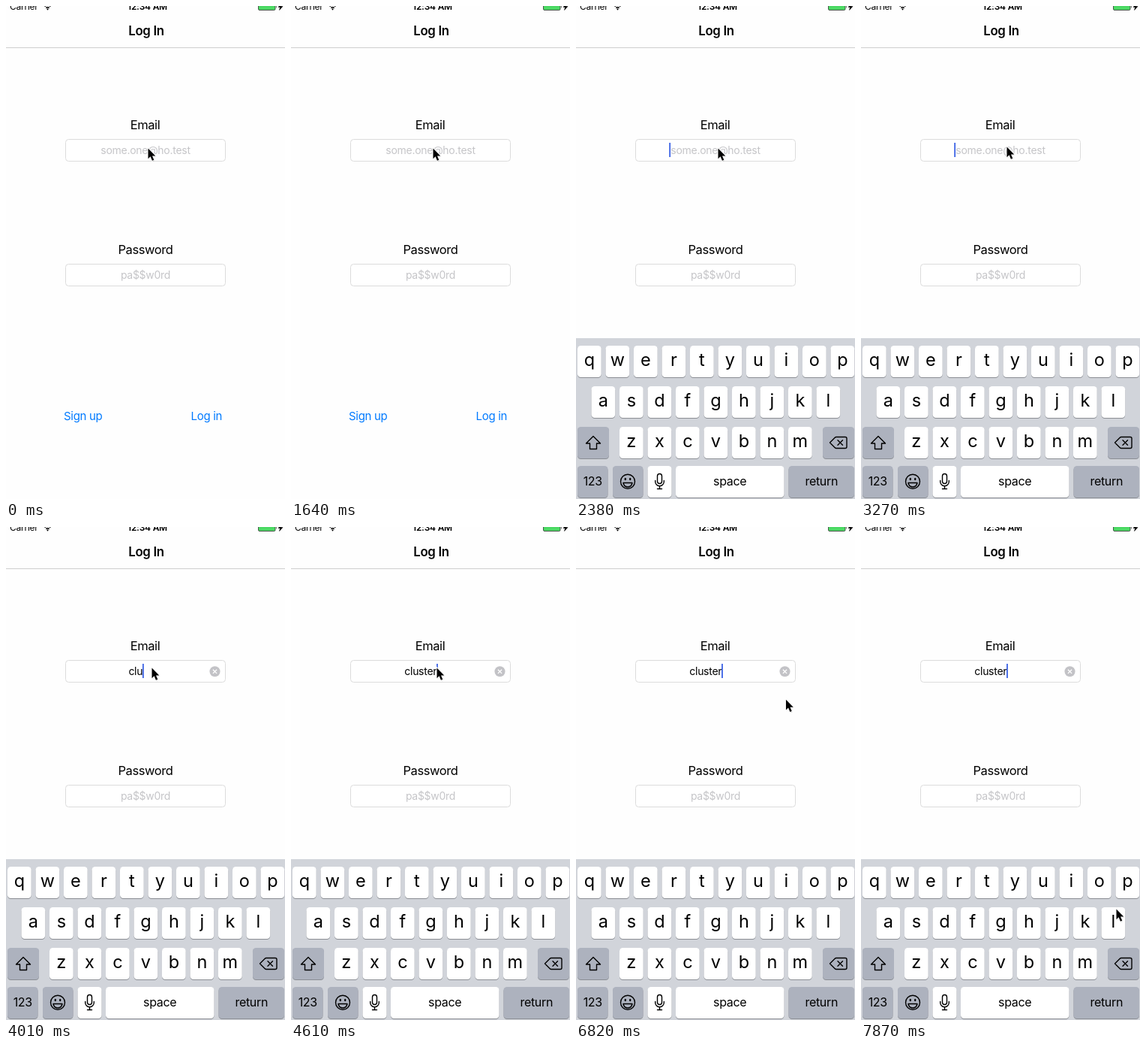
Recreate the animation shown at these times as an HTML page. Size 372 by 656 pixels, loop 8 s.

```html
<!DOCTYPE html>
<html lang="en">
<head>
<meta charset="utf-8">
<title>Log In</title>
<style>
  html, body { margin: 0; width: 100%; height: 100%; overflow: hidden; background: #fefefe; }
  svg { display: block; width: 372px; height: 656px; }
  text { font-family: Inter, Roboto, "Liberation Sans", sans-serif; letter-spacing: -.02em; }
  .mid { text-anchor: middle; }
  .label { font-size: 16.5px; letter-spacing: -.025em; }
  .input { font-size: 14px; }
  .hint { fill: #c5c5c8; }
  .link { font-size: 15px; fill: #007aff; }
  .letter { font-size: 23.5px; letter-spacing: 0; }
  .word { font-size: 16px; }
  .field { fill: #fff; stroke: #dcdcdc; }
  .line { fill: none; stroke: #000; stroke-width: 1.4; stroke-linejoin: round; stroke-linecap: round; }
</style>
</head>
<body>
<svg viewBox="0 0 372 656">
  <rect width="372" height="656" fill="#fefefe"/>

  <g id="status">
    <text x="5" y="5" font-size="12" letter-spacing="0">Carrier</text>
    <path d="M51.5 .5Q55.500-2.500 59.500 .5M53.300 2.700Q55.500 1 57.700 2.700" fill="none" stroke="#000" stroke-width="1.500"/>
    <circle cx="55.500" cy="4.300" r="1.100"/>
    <text class="mid" x="188.500" y="5" font-size="12" font-weight="600">12:34 AM</text>
    <rect x="336.500" y="-4" width="22.500" height="9.500" rx="1.500" fill="#4cd964" stroke="#333" stroke-width=".8"/>
    <path d="M360.500-1V2.500M367-3L363 1.500H365.500L364.500 5.500L369 .5H366.500L368-3Z" stroke="#000" stroke-width=".5"/>
  </g>
  <text class="mid" x="187" y="39" font-size="16.800" font-weight="600">Log In</text>
  <path d="M0 55.500H372" stroke="#cfcfcf"/>

  <text class="mid label" x="185.500" y="164">Email</text>
  <rect class="field" x="79.500" y="177.500" width="213" height="29" rx="4"/>
  <text class="mid input hint" id="hint" x="186" y="196.500">some.one@ho.test</text>
  <text class="mid input" id="typed" x="172.800" y="196.500"></text>
  <g id="clear">
    <circle cx="278.500" cy="192.300" r="7" fill="#c3c3c7"/>
    <path d="M275.900 189.700l5.200 5.200m0-5.200l-5.200 5.200" stroke="#fff" stroke-width="1.300"/>
  </g>
  <rect id="caret" y="182" width="1.900" height="19" fill="#4469e6"/>

  <text class="mid label" x="186" y="330">Password</text>
  <rect class="field" x="79.500" y="343.500" width="213" height="29" rx="4"/>
  <text class="mid input hint" x="186" y="362.500">pa$$w0rd</text>

  <text class="link" x="77" y="550.500">Sign up</text>
  <text class="link" x="246.500" y="550.500">Log in</text>

  <g id="keyboard">
    <rect y="442" width="372" height="220" fill="#d1d4da"/>
    <g id="keys"></g>
    <g class="line">
      <path d="M23 572.500L32.500 582H27.500V589.500H18.500V582H13.500Z"/>
      <path d="M338.500 581L345 574.500Q346 573.500 347 573.500H359Q361 573.500 361 575.500V586.500Q361 588.500 359 588.500H347Q346 588.500 345 587.500ZM349 577.700l6.500 6.600m0-6.600l-6.500 6.600"/>
      <circle cx="69" cy="632.700" r="9.500"/>
      <path d="M63 634.500H75Q74 640 69 640T63 634.500Z"/>
      <rect x="108.500" y="622.500" width="6" height="13" rx="3"/>
      <path d="M105.700 631.500V633a5.800 5.800 0 0 0 11.600 0V631.500M111.500 639V642.500M108.500 642.500H114.500"/>
    </g>
    <ellipse cx="65.800" cy="629.500" rx="1.200" ry="1.800"/>
    <ellipse cx="72.200" cy="629.500" rx="1.200" ry="1.800"/>
  </g>

  <circle id="touch" cx="191.500" cy="189.500" r="10" fill="#808080" fill-opacity=".4"/>
  <g id="mouse">
    <path d="M.5 1V15L3.800 12L6.200 17.500L8.800 16.400L6.400 11H11Z" fill="#000" fill-opacity=".15"/>
    <path d="M0 0V13.700L3.100 10.800L5.400 16.200L7.800 15.200L5.500 9.900H9.800Z" stroke="#fff" stroke-width="1.800" paint-order="stroke"/>
  </g>
</svg>
<script>
const LOOP = 8000;
const $ = id => document.getElementById(id);

function add(parent, tag, attrs, text = "") {
  const node = document.createElementNS("http://www.w3.org/2000/svg", tag);
  for (const name in attrs) node.setAttribute(name, attrs[name]);
  node.textContent = text;
  parent.append(node);
}

function addKey(x, y, width, text = "", dark = false) {
  const shape = { x, width, height: 42, rx: 4.5 };
  add($("keys"), "rect", { ...shape, y: y + 1, fill: "#8b8e94" });
  add($("keys"), "rect", { ...shape, y, fill: dark ? "#adb2be" : "#fff" });
  const single = text.length === 1;
  add($("keys"), "text", {
    class: single ? "mid letter" : "mid word",
    x: x + width / 2, y: y + (single ? 27 : 26)
  }, text);
}

[["qwertyuiop", 2, 452], ["asdfghjkl", 20.5, 506], ["zxcvbnm", 58, 560]].forEach(([row, x, y]) =>
  [...row].forEach((letter, i) => addKey(x + 37.5 * i, y, 31.7, letter)));
addKey(2, 560, 42, "", true);
addKey(329, 560, 42, "", true);
addKey(2, 612, 40.5, "123", true);
addKey(49, 612, 40.5, "", true);
addKey(95.5, 612, 32, "");
addKey(133, 612, 144.5, "space");
addKey(283.5, 612, 87.5, "return", true);

// [time, x, y] of the pointer tip
const path = [
  [0, 189.5, 189.5], [2380, 189.5, 189.5], [2670, 194.5, 187.5], [5070, 194.5, 187.5],
  [5510, 232, 224], [5950, 270, 272], [6230, 275, 280], [6520, 271, 252], [6820, 279.5, 228.5],
  [7120, 292, 262], [7270, 301, 292], [7420, 314, 362], [7570, 331, 450], [7720, 339, 498], [7870, 340.5, 508.5]
];
const typing = [[3570, 1], [3860, 2], [4010, 3], [4310, 4], [4460, 6], [4610, 7]];
const caretOff = [[2820, 3270], [5210, 5650], [6230, 6670], [7270, 7720]];
const touches = [[290, 440], [1490, 1640]];

const within = (t, spans) => spans.some(([from, to]) => t >= from && t < to);
const show = (id, on) => $(id).setAttribute("visibility", on ? "visible" : "hidden");

function pointerAt(t) {
  const next = path.findIndex(point => point[0] > t);
  if (next < 0) return path.at(-1).slice(1);
  const [a, b] = [path[next - 1], path[next]];
  const k = (t - a[0]) / (b[0] - a[0]);
  return [1, 2].map(i => a[i] + (b[i] - a[i]) * k);
}

// The pointer moves in steps of about 148 ms.
const stepTime = t => Math.floor((t + 15) / 148.3) * 148.5;

function render(t) {
  const count = typing.reduce((n, [time, letters]) => t >= time ? letters : n, 0);
  $("typed").textContent = "cluster".slice(0, count);
  show("hint", !count);
  show("clear", count);
  show("touch", within(t, touches));

  show("keyboard", t >= 2230);
  $("keyboard").setAttribute("transform", `translate(0 ${t < 2380 ? 6 : 0})`);

  show("caret", t >= 2230 && !within(t, caretOff));
  const end = count ? 172.8 + $("typed").getComputedTextLength() / 2 - .3 : 124.2;
  $("caret").setAttribute("x", end);

  $("mouse").setAttribute("transform", `translate(${pointerAt(stepTime(t))})`);
}

const start = performance.now();
function frame() {
  render((performance.now() - start) % LOOP);
  requestAnimationFrame(frame);
}
frame();
</script>
</body>
</html>
```
